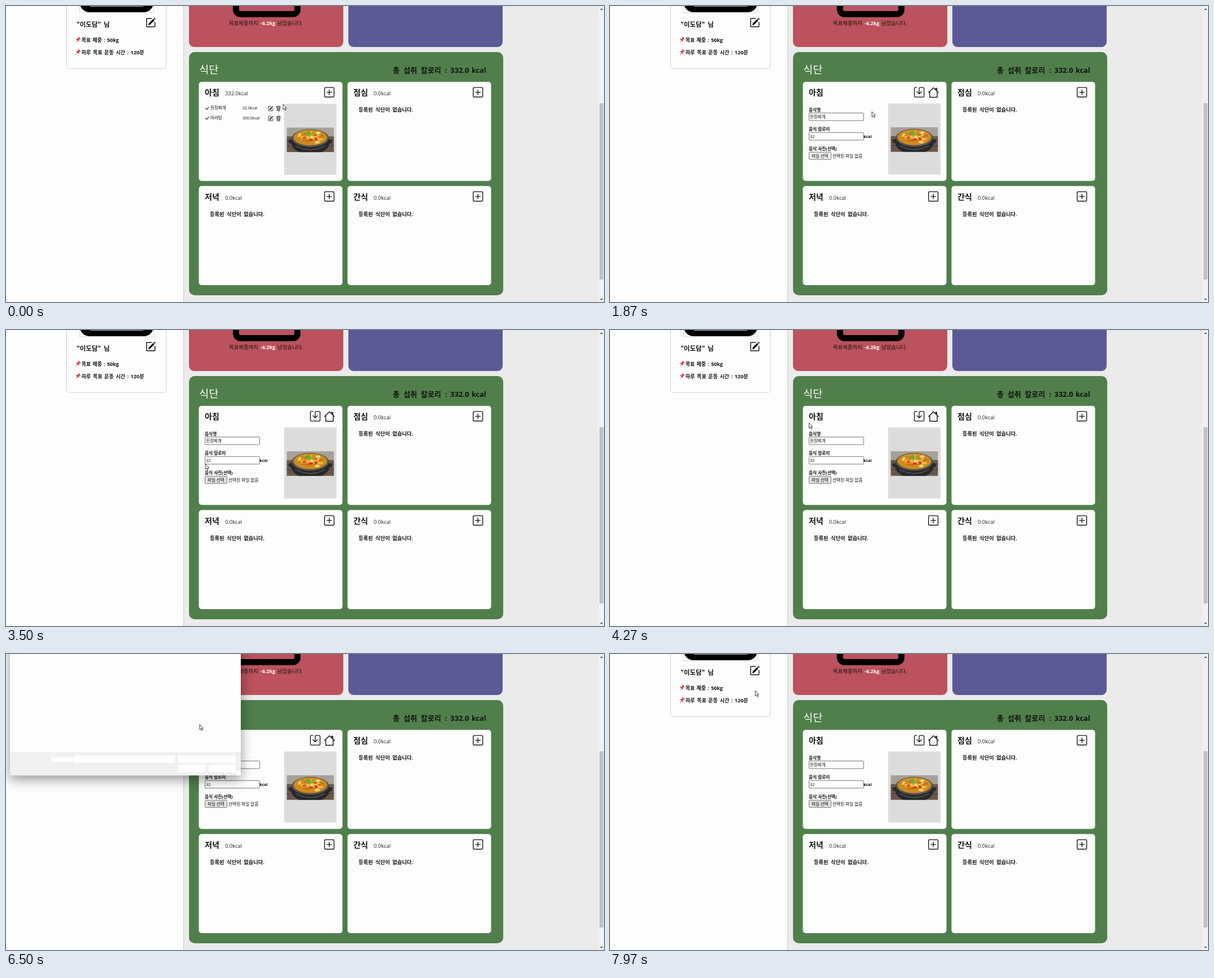
Write an HTML page that moves like this. It is 1062 by 527 pixels and loops after 8 s.

```html
<!DOCTYPE html>
<html lang="ko">
<head>
<meta charset="utf-8">
<title>식단</title>
<style>
  html, body { margin: 0; width: 100%; height: 100%; overflow: hidden; background: #ebebeb; }
  svg { display: block; }
  text { font-family: "Open Sans", "Noto Sans CJK KR", "Noto Sans CJK", sans-serif; white-space: pre; }
  .line { fill: none; stroke: #111; stroke-linecap: round; stroke-linejoin: round; }
  #dialog { transform-origin: 212px 100px; filter: drop-shadow(0 7px 11px rgba(0, 0, 0, .42)); }
</style>
</head>
<body>
<svg id="stage" width="1062" height="527" viewBox="0 0 1062 527"></svg>
<script>
const LOOP = 8000;
const stage = document.getElementById('stage');

// Markup helpers
const text = (x, y, size, str, { w = 400, fill = '#111', ws = 0, anchor = 'start' } = {}) =>
  `<text x="${x}" y="${y}" font-size="${size}" font-weight="${w}" fill="${fill}" word-spacing="${ws}" text-anchor="${anchor}">${str}</text>`;
const box = (x, y, w, h, fill, r = 0, stroke = 'none') =>
  `<rect x="${x}" y="${y}" width="${w}" height="${h}" rx="${r}" fill="${fill}" stroke="${stroke}"/>`;
const oval = (x, y, rx, ry, fill) => `<ellipse cx="${x}" cy="${y}" rx="${rx}" ry="${ry}" fill="${fill}"/>`;
const line = (d, width = 1, color = '#111') => `<path class="line" d="${d}" stroke-width="${width}" style="stroke:${color}"/>`;
const place = (x, y, scale, body) => `<g transform="translate(${x} ${y}) scale(${scale})">${body}</g>`;
const group = (id, body) => `<g id="${id}">${body}</g>`;
const bold = { w: 700 };

// Icons on a 16-unit grid
const icons = {
  plus: line('M2 .6H14A1.4 1.4 0 0 1 15.4 2V14A1.4 1.4 0 0 1 14 15.4H2A1.4 1.4 0 0 1 .6 14V2A1.4 1.4 0 0 1 2 .6M8 4.3V11.7M4.3 8H11.7', 1.2),
  save: line('M4.5 .5H2A1.5 1.5 0 0 0 .5 2V14A1.5 1.5 0 0 0 2 15.5H14A1.5 1.5 0 0 0 15.5 14V2A1.5 1.5 0 0 0 14 .5H9.5A1.5 1.5 0 0 0 8 2V10.4M4.5 7L8 10.5 11.5 7', 1.15),
  house: line('M.6 8L8 .8 15.4 8M2.4 7V15.3H13.6V7M11.4 3.6V1.7H13V5.4', 1.2),
  edit: line('M9 1.5H2.5A1 1 0 0 0 1.5 2.5V13.5A1 1 0 0 0 2.5 14.5H13.5A1 1 0 0 0 14.5 13.5V7.5', 1.3)
    + '<path d="M13.8.5L15.6 2.3 14.5 3.6 12.4 1.6ZM11.8 2.3L13.8 4.3 6.8 11.3 4 12.2 4.9 9.2Z" fill="#111"/>',
  trash: line('M1.8 3.2H14.2M5.5 3V1H10.5V3M3.2 3.5L4 15.4H12L12.8 3.5M5.7 5.8L6 13M8 5.8V13M10.3 5.8L10 13', 1.2),
  pin: '<g transform="rotate(42 8 8)" fill="#d3273c">' + box(4, 0, 8, 3, '#d3273c', 1) + box(5.5, 2, 5, 5, '#e0475a')
    + box(3, 6.5, 10, 3, '#d3273c', 1) + box(7.4, 9.5, 1.3, 7, '#777') + '</g>'
};

function seeded(seed) {
  return () => (seed = (seed * 16807) % 2147483647) / 2147483647;
}

function scatter(n, cx, cy, rx, ry, colors, seed) {
  const rnd = seeded(seed);
  let out = '';
  for (let i = 0; i < n; i++) {
    const a = rnd() * 6.283, d = Math.sqrt(rnd());
    out += oval((cx + Math.cos(a) * d * rx).toFixed(1), (cy + Math.sin(a) * d * ry).toFixed(1),
      (1.5 + rnd() * 3).toFixed(1), (1 + rnd() * 1.6).toFixed(1), colors[i % colors.length]);
  }
  return out;
}

const picture = (x, y, w, h, body) =>
  `<svg x="${x}" y="${y}" width="${w}" height="${h}" viewBox="0 0 84 44" preserveAspectRatio="none">${body}</svg>`;

const stew = box(0, 0, 84, 44, '#a5a199') + box(0, 16, 84, 28, '#69564b')
  + line('M0 23H84M0 33H84', 1, '#4d3e37')
  + oval(9, 25, 6, 4, '#292a2c') + oval(75, 25, 6, 4, '#292a2c')
  + oval(42, 27, 34, 21, '#26282b') + oval(42, 19, 33, 16, '#54534d') + oval(42, 18, 30, 14, '#cf8a20')
  + scatter(34, 42, 18, 25, 10, ['#e8b62e', '#f0d67a', '#c96d17', '#eac553'], 41)
  + oval(38, 10, 5, 3, '#6fa62c') + oval(44, 13, 4, 2, '#83b83b')
  + oval(43, 22, 4, 2, '#d6361c') + oval(52, 20, 3, 2, '#d6361c') + oval(31, 19, 3, 2, '#d8501f')
  + line('M16 33Q42 47 68 33', 1, '#6d7075');

const dumplings = box(0, 0, 84, 44, '#e2512c') + oval(42, 24, 38, 18, '#f1ece6') + oval(42, 23, 32, 14, '#ddd2c8')
  + [[25, 19], [42, 13], [58, 18], [19, 27], [35, 27], [51, 28], [65, 26]]
    .map(([x, y]) => oval(x, y, 10, 7, '#bd6a38') + oval(x - 1, y - 2, 6, 3, '#d68d55')).join('');

const pasta = box(0, 0, 84, 44, '#c9cfca') + box(0, 0, 84, 12, '#9fae9b') + oval(42, 26, 40, 17, '#f7f6f2')
  + oval(42, 23, 29, 12, '#e6cc72') + scatter(16, 42, 22, 24, 9, ['#f0dd91', '#dcbb57'], 17)
  + oval(43, 19, 18, 8, '#8e3a20') + scatter(8, 43, 18, 13, 5, ['#a84a29', '#70301d'], 9)
  + oval(44, 14, 4, 2, '#6f973d');

// Page
function mealCard(x, y, name, kcal) {
  return box(x, y, 255, 176.5, '#fdfdfd', 5) + text(x + 10.5, y + 24, 14, name, bold)
    + (kcal ? text(x + 46.5, y + 24, 9.4, kcal, { fill: '#222' }) + place(x + 222.5, y + 9.5, 1.14, icons.plus)
      + text(x + 19.5, y + 53, 9.3, '등록된 식단이 없습니다.', { w: 700, ws: 2 }) : '');
}

const page = box(0, 0, 1062, 527, '#ebebeb')
  + box(0, 0, 315, 527, '#fdfdfe') + box(315, 0, 1, 527, '#c9c9c9')
  + box(107.5, -20, 177, 131.5, '#fefefe', 5, '#cfcfd4')
  + box(130.5, -10, 132, 22, '#fefefe', 0, '#d4d4d4')
  + box(131, -40, 131, 51, '#000', 17) + box(147, -20, 99, 20.8, '#fefefe', 4)
  + text(125.5, 36.5, 11.6, '"이도담" 님', { w: 700, ws: 2 })
  + place(248, 20.5, 1.14, icons.edit)
  + place(122.5, 55.5, .62, icons.pin) + place(122.5, 77.5, .62, icons.pin)
  + text(134, 63.5, 9, '목표 체중 : 50kg', { w: 700, ws: .9 })
  + text(134, 85.7, 9.1, '하루 목표 운동 시간 : 120분', { w: 700, ws: 1.2 })
  + box(325, -20, 274, 93, '#bb525d', 9) + box(608, -20, 274, 93, '#5b5a94', 9)
  + '<rect x="408.5" y="-60" width="109" height="74.5" rx="8" fill="none" stroke="#000" stroke-width="11"/>'
  + text(396, 34, 9.4, '목표체중까지') + text(452, 34, 9, '-6.2kg', { w: 700, fill: '#fff' }) + text(482, 34, 9.4, '남았습니다.')
  + box(325, 82, 558, 433, '#507f4b', 10)
  + text(343, 119.5, 18.7, '식단', { w: 500, fill: '#fff' })
  + text(687, 119, 13, '총 섭취 칼로리 :', { w: 700, ws: 3.6 })
  + text(789, 119, 13, '332.0', bold) + text(827, 119, 12.6, 'kcal', bold)
  + mealCard(342.5, 135, '아침') + mealCard(606.5, 135, '점심', '0.0kcal')
  + mealCard(342.5, 320.5, '저녁', '0.0kcal') + mealCard(606.5, 320.5, '간식', '0.0kcal')
  + box(1052, 0, 10, 527, '#f1f1f1') + box(1054, 173, 7, 314, '#c1c1c1')
  + '<path d="M1055 7L1057.5 4 1060 7ZM1055 521L1057.5 524 1060 521Z" fill="#555"/>';

const foodRow = (y, name, kcal) => line(`M354.5 ${y}l2 2.2 3.5-4.2`, 1.1)
  + text(363, y + 2, 7.5, name) + text(420, y + 2, 7, kcal)
  + place(465, y - 4.3, .62, icons.edit) + place(479, y - 4.5, .61, icons.trash);

const list = text(389, 159, 9.4, '332.0kcal', { fill: '#222' }) + place(565, 144.5, 1.14, icons.plus)
  + foodRow(182, '된장찌개', '32.0kcal') + foodRow(199.7, '마라탕', '300.0kcal')
  + box(494, 174, 93, 126.5, '#dcdcdc') + picture(498.5, 216.2, 84, 44, stew);

const field = (y, label, value) => text(353, y, 7.7, label, bold)
  + box(353.5, y + 3, 97, 13.5, '#fff', 1, '#767676') + text(355, y + 12.4, 7.5, value);

const form = place(540, 144.5, 1.14, icons.save) + place(565, 144.5, 1.18, icons.house)
  + field(187.5, '음식명', '된장찌개') + field(222.3, '음식 칼로리', '32')
  + text(450.5, 234.8, 7, 'kcal', bold) + text(353, 257.3, 7.7, '음식 사진(선택)', bold)
  + '<rect id="pick" x="353.5" y="260.3" width="39" height="13" rx="1.5" stroke="#767676"/>'
  + text(358, 269.5, 7.5, '파일 선택') + text(395, 269.5, 7.7, '선택된 파일 없음')
  + box(494, 173.5, 93, 126.5, '#dcdcdc') + picture(498.5, 215.7, 84, 44, stew);

// File picker
const chevron = (x, y) => line(`M${x - 2} ${y - 1}l2 2 2-2`, .8, '#555');
const navItem = (y, name, pinned) => line(`M12.5 ${y - 2}l2 2-2 2`, .8, '#555')
  + line(`M24.5 ${y - 4.3}h4l2.5 2.5v6h-6.5ZM28.5 ${y - 4.3}v2.5h2.5`, .7, '#777')
  + text(35, y + 2.5, 7.2, name)
  + (pinned ? line(`M80 ${y + 2.5}l2-2M80.5 ${y - 1}l3 3M82 ${y - 2.5}l3 3M81 ${y - .5}l1.5-1.5M83 ${y + 1.5}l1.5-1.5`, .9, '#777') : '');
const caption = { anchor: 'middle' };

const blank = box(78, 185, 40, 8, '#fff') + box(119, 182, 182, 13, '#fff') + box(306.5, 182, 104.5, 13, '#fff')
  + box(306.5, 198.5, 50, 14, '#fff') + box(362, 198.5, 49, 14, '#fff') + box(411, 208.5, 9, 9.5, '#fafafa');

const content = box(4, -10, 416, 32.5, '#f8f8f8') + box(4, 22, 416, 1, '#e6e6e6')
  + text(14, 15.5, 7.3, '구성') + '<path d="M30 12h5l-2.5 3ZM366.500 12h5l-2.500 3Z" fill="#333"/>' + text(52, 15.5, 7.3, '새 폴더')
  + box(354.5, 10, 6.5, 6, '#fff', .5, '#444') + box(384.5, 10, 7, 6, '#fff', .5, '#444') + box(388.5, 10.2, 3, 5.6, '#2386d1')
  + '<circle cx="407.5" cy="13.3" r="4.600" fill="#0a78c8"/>' + text(407.5, 16, 7, '?', { w: 700, fill: '#fff', anchor: 'middle' })
  + box(6, 61, 81, 17, '#d9d9d9', 1)
  + navItem(34, '홈') + navItem(51.5, '갤러리') + navItem(69.3, 'HazeNook')
  + box(10, 87, 72, 1, '#dedede')
  + ['바탕 화면', '다운로드', '문서', '사진', '음악'].map((n, i) => navItem(104.5 + i * 17.7, n, true)).join('')
  + box(91, 32, 1.3, 55, '#777', .6) + box(96, 23, 1, 153, '#ececec')
  + picture(109.5, 43, 51, 35, dumplings) + picture(172, 51, 51, 27, stew) + picture(234.5, 44, 51, 34, pasta)
  + text(135.5, 86, 7, '김치만두.jpg', caption) + text(198, 86, 7, '된장찌개.jpg', caption) + text(260.5, 86, 7, '스파게티.jpg', caption)
  + box(4, 176, 416, 36, '#f0f0f0') + text(76, 191, 7.2, '파일 이름(N):')
  + box(119.5, 182.5, 180.500, 12.500, '#fff', 1, '#3f8fc4') + chevron(295, 189)
  + box(306.5, 182.5, 104, 12.5, '#fff', 1, '#d5d5d5') + text(309, 191, 6.6, '이미지 파일 (*.xbm;*.tif;*.jfif;*.i') + chevron(406, 189)
  + box(307.5, 199, 47.5, 12.5, '#fdfdfd', 2, '#4681b0') + text(331, 208, 7.2, '열기(O)', caption)
  + box(362.5, 199, 48, 12.5, '#fdfdfd', 2, '#d5d5d5') + text(386.5, 208, 7.2, '취소', caption)
  + line('M415.500 216l3-3M417.500 216l1-1', .7, '#999');

const dialog = '<path d="M4 -20H420V214A4 4 0 0 1 416 218H8A4 4 0 0 1 4 214Z" fill="#f0f0f0"/>'
  + box(4, -20, 416, 196, '#fdfdfd') + group('blank', blank) + group('content', content);

const arrow = '<path d="M0 0V9.200L2.100 7.300 3.700 10.800 5.200 10.100 3.700 6.700H6.400Z" fill="#fff" stroke="#111" stroke-width=".8"/>';
const hand = '<path d="M1.500 1Q2.500 -.5 3.500 1V5L8 6Q9 6.500 8.800 8L8 12.500H3L.2 8.300Q-.8 7 .5 6.700L1.500 7.500Z" fill="#fff" stroke="#111" stroke-width=".9"/>'
  + line('M5 5.500V7.500M6.800 6V7.700', .6);

stage.innerHTML = page + group('list', list) + group('form', form) + group('dialog', dialog)
  + group('cursor', group('arrow', arrow) + group('hand', hand));

// Pointer route: time, x, y
const route = [
  [0, 492, 175], [350, 492, 175], [950, 482, 183], [1150, 482, 183], [1450, 470, 182], [1750, 470, 182],
  [2500, 400, 269.5], [3100, 400, 269.5], [3600, 349, 235], [4200, 353.500, 165.500], [4600, 353.500, 165.500],
  [5050, 349, 215], [5550, 374, 266], [6000, 374, 266], [6450, 344, 125.500], [6800, 344, 125.500],
  [7450, 258, 65.500], [LOOP, 258, 65.500]
];
const el = id => document.getElementById(id);
const parts = Object.fromEntries(['list', 'form', 'pick', 'dialog', 'blank', 'content', 'cursor', 'arrow', 'hand'].map(id => [id, el(id)]));
const show = (id, on) => parts[id].setAttribute('display', on ? 'inline' : 'none');
const ramp = (t, a, b) => Math.min(1, Math.max(0, (t - a) / (b - a)));
const smooth = k => k * k * (3 - 2 * k);

function pointer(t) {
  const i = route.findIndex(p => p[0] > t);
  const [t0, x0, y0] = route[i - 1], [t1, x1, y1] = route[i];
  const k = smooth(ramp(t, t0, t1));
  return [x0 + (x1 - x0) * k, y0 + (y1 - y0) * k];
}

function draw(t) {
  const editing = t >= 1700;
  show('list', !editing);
  show('form', editing);
  parts.pick.setAttribute('fill', t < 3370 ? '#efefef' : '#e2e2e2');

  const closing = ramp(t, 7840, 7940);
  show('dialog', t >= 6430 && closing < 1);
  show('blank', t < 6700);
  show('content', t >= 6700);
  const scale = .975 + .025 * ramp(t, 6430, 6600) - .04 * closing;
  parts.dialog.style.transform = `scale(${scale})`;
  parts.dialog.style.opacity = ramp(t, 6400, 6480) * (1 - closing);

  const pointing = t >= 750 && t < 1800;
  show('hand', pointing);
  show('arrow', !pointing);
  parts.cursor.setAttribute('transform', `translate(${pointer(t)})`);
}

const start = performance.now();
function tick() {
  draw((performance.now() - start) % LOOP);
  requestAnimationFrame(tick);
}
tick();
</script>
</body>
</html>
```
